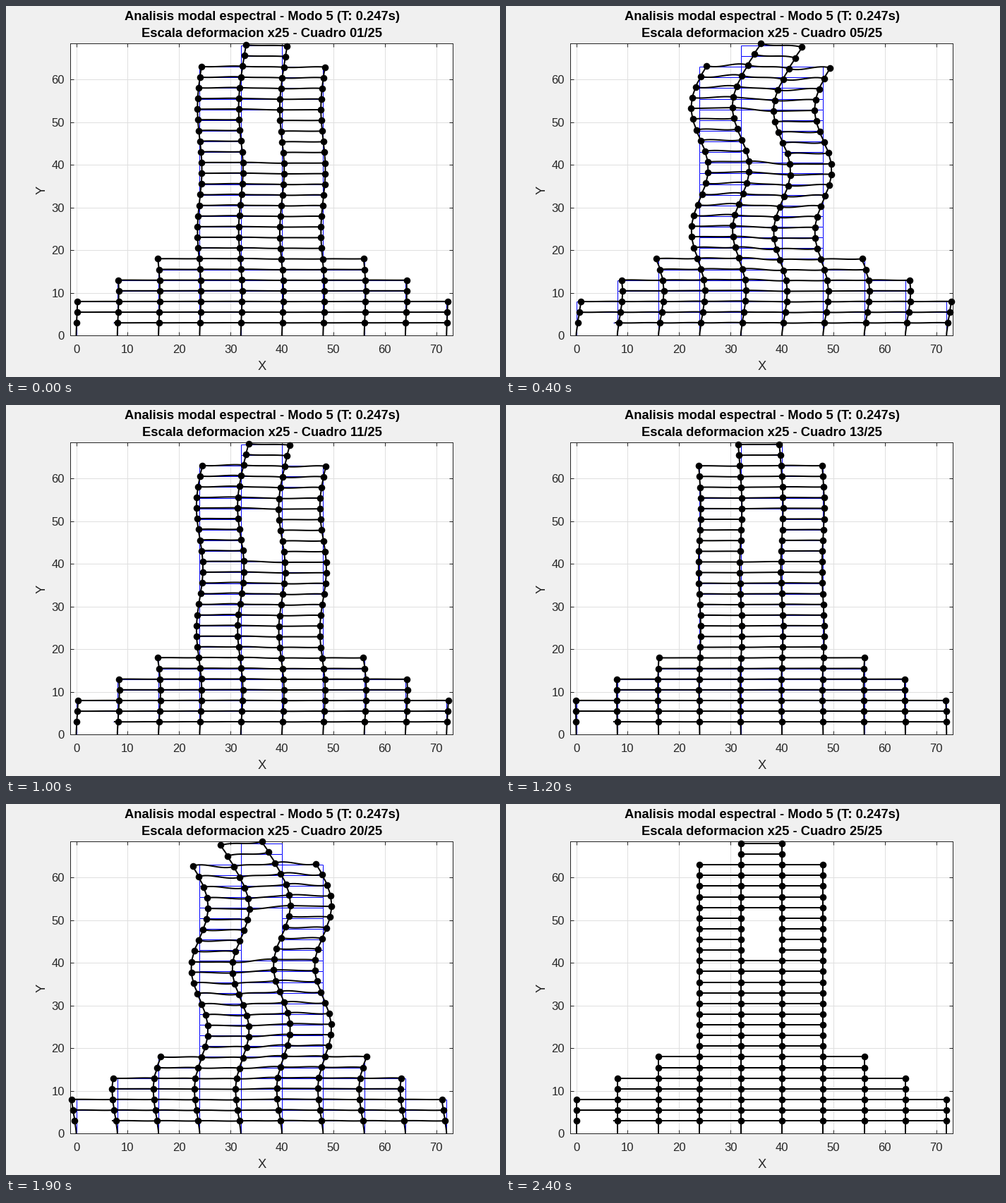
Write a matplotlib script that moves like this. It is 700x526 px and loops after 2500 ms.

```python
import numpy as np
import matplotlib.pyplot as plt
from matplotlib.animation import FuncAnimation
from matplotlib.collections import LineCollection

W, H, DPI = 700, 526, 100
FRAMES, INTERVAL = 25, 100
PT = 72 / DPI
INK = "#262626"
plt.rcParams["font.family"] = "Liberation Sans"

# Building: storey levels, column heights, horizontal mode shape
levels = np.concatenate([[0], np.arange(3, 68.1, 2.5)])
tops = {0: 8, 8: 13, 16: 18, 24: 63, 32: 68, 40: 68, 48: 63, 56: 18, 64: 13, 72: 8}
sway = np.array([
    0, .29, .66, .95, 1.07, .87, .28, -.44, -1.16, -1.61, -1.64, -1.20, -.42, .45,
    1.26, 1.69, 1.62, 1.09, .20, -.69, -1.41, -1.72, -1.50, -.82, .24, 1.43, 2.73, 4.08])
# Joints turn less in the stiffer podium
spin = np.where(levels <= 18, 0.45, 0.7) * np.gradient(sway, levels)
spin[0] = 0
axial = {24: .26, 32: .45, 40: -.45, 48: -.26}

t = np.linspace(0, 1, 14)
H00, H10 = 2 * t**3 - 3 * t**2 + 1, t**3 - 2 * t**2 + t
H01, H11 = 3 * t**2 - 2 * t**3, t**3 - t**2


def hermite(a, b, da, db):
    return a * H00 + da * H10 + b * H01 + db * H11


def lift(x, y):
    return axial.get(x, 0) * np.sin(np.pi / 2 * min(y / 63, 1))


def has_beam(x, y):
    if min(tops[x], tops[x + 8]) < y:
        return False
    if y == 3 and x == 0:
        return False
    return not (x == 32 and 41 < y < 52)


def column(x, i):
    lo, hi = levels[i], levels[i + 1]
    h = hi - lo
    rest = np.column_stack([np.full_like(t, x), lo + h * t])
    dx = hermite(sway[i], sway[i + 1], h * spin[i], h * spin[i + 1])
    dy = lift(x, lo) * (1 - t) + lift(x, hi) * t
    return rest, np.column_stack([dx, dy])


def beam(x, i):
    y = levels[i]
    rest = np.column_stack([x + 8 * t, np.full_like(t, y)])
    dy = hermite(lift(x, y), lift(x + 8, y), -8 * spin[i], -8 * spin[i])
    return rest, np.column_stack([np.full_like(t, sway[i]), dy])


members, nodes = [], []
for x, top in tops.items():
    for i, y in enumerate(levels):
        if y > top:
            break
        if y < top:
            members.append(column(x, i))
        if y > 0:
            nodes.append((x, y, sway[i], lift(x, y)))
            if x < 72 and has_beam(x, y):
                members.append(beam(x, i))
# Short overhang at the first floor
members.append((np.array([[7.25, 3], [8, 3]]), np.array([[sway[1], 0]] * 2)))
nodes = np.array(nodes)

fig = plt.figure(figsize=(W / DPI, H / DPI), dpi=DPI, facecolor="#f0f0f0")
left, right, top, bottom = 91, 633, 52.9, 467.3
x_zero, x_scale, y_scale = 99.5, 7.288, 6.05
ax = fig.add_axes([left / W, 1 - bottom / H, (right - left) / W, (bottom - top) / H])
ax.set_xlim((left - x_zero) / x_scale, (right - x_zero) / x_scale)
ax.set_ylim(0, (bottom - top) / y_scale)
ax.set_xticks(range(0, 71, 10))
ax.set_yticks(range(0, 61, 10))
ax.set_axisbelow(True)
ax.grid(color="#dfdfdf", lw=PT)
ax.tick_params(direction="in", top=True, right=True, length=5.4 * PT, width=PT,
               color=INK, labelcolor=INK, labelsize=16.67 * PT)
ax.tick_params(axis="x", pad=12.5 * PT)
ax.tick_params(axis="y", pad=8 * PT)
for spine in ax.spines.values():
    spine.set(color=INK, linewidth=PT)


def label(x, y, text, **kw):
    return fig.text(x / W, 1 - y / H, text, fontsize=18.33 * PT, ha="center", **kw)


label(363, 516.5, "X", color=INK)
label(51.5, 261, "Y", color=INK, rotation=90, va="center")
label(362.5, 20.5, "Analisis modal espectral - Modo 5 (T: 0.247s)", weight="bold")
caption = label(362.5, 44.5, "", weight="bold")

ax.add_collection(LineCollection([rest[[0, -1]] for rest, _ in members],
                                 colors="#0000ff", linewidths=PT, zorder=3),
                  autolim=False)
frame = LineCollection([], colors="black", linewidths=2 * PT, zorder=4, clip_on=False)
ax.add_collection(frame, autolim=False)
joints, = ax.plot([], [], "o", color="black", ms=9.6 * PT, mew=0, zorder=5,
                  clip_on=False, scalex=False, scaley=False)


def update(k):
    n = k + 1
    s = np.sin(2 * np.pi * n / FRAMES)
    frame.set_segments([rest + s * move for rest, move in members])
    joints.set_data(nodes[:, 0] + s * nodes[:, 2], nodes[:, 1] + s * nodes[:, 3])
    caption.set_text(f"Escala deformacion x25 - Cuadro {n:02d}/{FRAMES}")
    return frame, joints, caption


anim = FuncAnimation(fig, update, frames=FRAMES, interval=INTERVAL,
                     repeat=True, repeat_delay=0)
plt.show()
```
